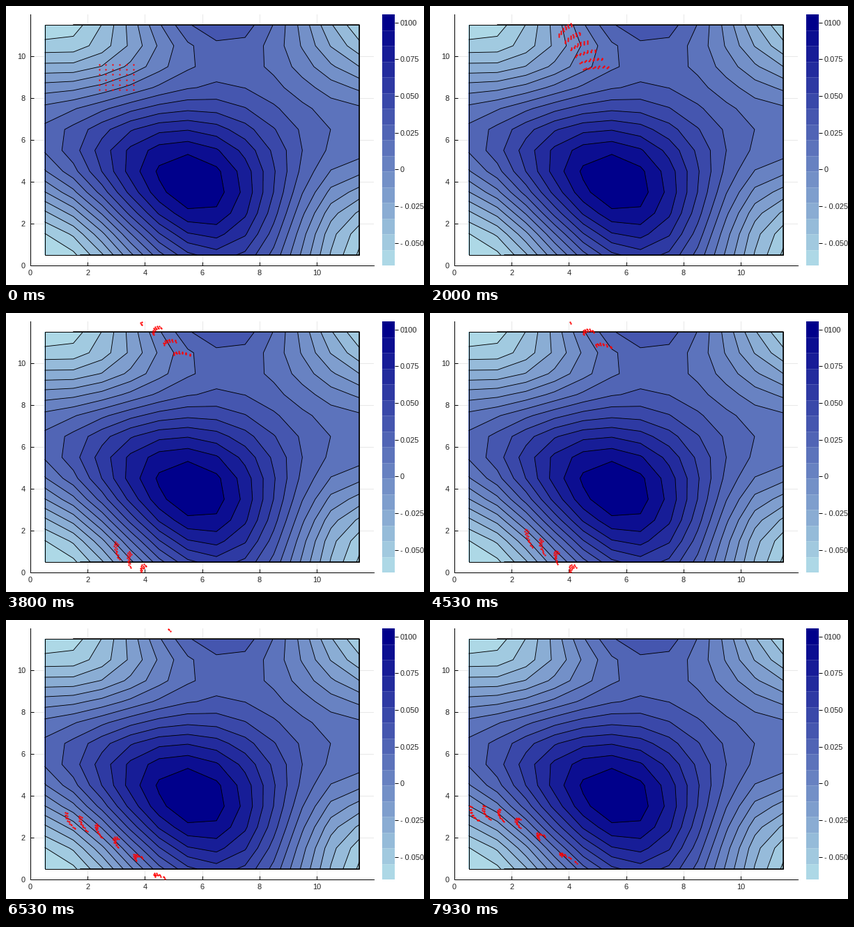
These frames come from a looping animation (600x400 px, 8000 ms). A matplotlib script:

```python
import numpy as np
import matplotlib.pyplot as plt
from matplotlib.animation import FuncAnimation
from matplotlib.patches import Rectangle

W, H, DPI = 600, 400, 100
PX = 72 / DPI
N = 12
K = 2 * np.pi / N
FRAMES, LOOP = 120, 8000
TAIL = 3
STAGGER = 0.5  # the flow sits half a cell to the right of the contours

plt.rcParams["font.family"] = "Liberation Sans"
plt.rcParams["font.size"] = 11 * PX

# Amplitudes of (1, cos, sin) in y against (1, cos, sin) in x, in contour bands
AMP = np.array([[8.06, -3.93, 0.75],
                [-2.30, -1.84, -0.78],
                [2.15, -1.345, 1.40]])


def waves(s):
    a = K * (s - 0.5)
    return np.array([np.ones_like(a), np.cos(a), np.sin(a)])


def slopes(s):
    a = K * (s - 0.5)
    return K * np.array([np.zeros_like(a), -np.sin(a), np.cos(a)])


def velocity(p, t):
    x, y = p[:, 0] - STAGGER, p[:, 1]
    psi_x = np.sum(waves(y) * (AMP @ slopes(x)), axis=0)
    psi_y = np.sum(slopes(y) * (AMP @ waves(x)), axis=0)
    return 0.042 / (1 + t / 60) * np.column_stack([-psi_y, psi_x])


def trace():
    gx, gy = np.meshgrid(np.linspace(2.4, 3.6, 6), np.linspace(8.4, 9.6, 6))
    p = np.column_stack([gx.ravel(), gy.ravel()])
    path = [p]
    for t in range(FRAMES - 1):
        half = p + 0.5 * velocity(p, t)
        p = p + velocity(half, t + 0.5)
        path.append(p)
    return np.array(path) % N


path = trace()
cells = np.arange(N) + 0.5
psi = waves(cells).T @ AMP @ waves(cells)

fig = plt.figure(figsize=(W / DPI, H / DPI), dpi=DPI, facecolor="white")


def pixel_axes(x0, y0, x1, y1):
    return fig.add_axes([x0 / W, 1 - y1 / H, (x1 - x0) / W, (y1 - y0) / H])


light, dark = np.array([173, 216, 230]) / 255, np.array([0, 0, 139]) / 255
bands = [light + (dark - light) * k / 15 for k in range(16)]

ax = pixel_axes(35, 12, 528, 372)
ax.set(xlim=(0, N), ylim=(0, N), xticks=range(0, N, 2), yticks=range(0, N, 2))
ax.set_axisbelow(True)
ax.grid(color="#e8e8e8", lw=PX)
ax.spines[["top", "right"]].set_visible(False)
ax.spines[["left", "bottom"]].set_linewidth(PX)
ax.tick_params(direction="in", length=5 * PX, width=PX, labelcolor="#222222")
ax.tick_params(axis="x", pad=6 * PX)
ax.tick_params(axis="y", pad=7 * PX)

ax.contourf(cells, cells, psi, levels=[-1, *range(1, 16), 17], colors=bands)
ax.contour(cells, cells, psi, levels=range(1, 16), colors="black",
           linewidths=0.9 * PX)
ax.add_patch(Rectangle((0.5, 0.5), 11, 11, fill=False, lw=PX, zorder=3))
ax.plot([1.5, 11.5, 11.5, 1.75], [11.5, 11.5, 0.5, 0.5],
        color="black", lw=1.5 * PX, zorder=3)

bar = pixel_axes(540, 12, 558, 372)
lo, hi = -0.0653, 0.1055
bar.imshow(np.array(bands)[:, None, :], origin="lower", aspect="auto",
           interpolation="nearest", extent=(0, 1, lo, hi))
for edge in np.linspace(lo, hi, 17)[1:-1]:
    bar.axhline(edge, color="white", lw=0.5 * PX, alpha=0.3)
bar.spines[:].set_visible(False)
bar.set_xticks([])
bar.yaxis.tick_right()
bar.set_yticks(np.arange(-2, 5) * 0.025,
               ["- 0.050", "- 0.025", "0", "0.025", "0.050", "0.075", "0100"])
bar.tick_params(axis="y", length=5 * PX, width=PX, pad=3 * PX,
                labelcolor="#222222")

dots, = ax.plot([], [], "o", color="red", ms=2.3 * PX, mew=0, zorder=5)


def draw(i):
    pts = path[max(0, i - TAIL + 1):i + 1].reshape(-1, 2)
    dots.set_data(pts[:, 0], pts[:, 1])
    return dots,


anim = FuncAnimation(fig, draw, frames=FRAMES, interval=LOOP / FRAMES,
                     repeat=True, repeat_delay=0)
plt.show()
```
